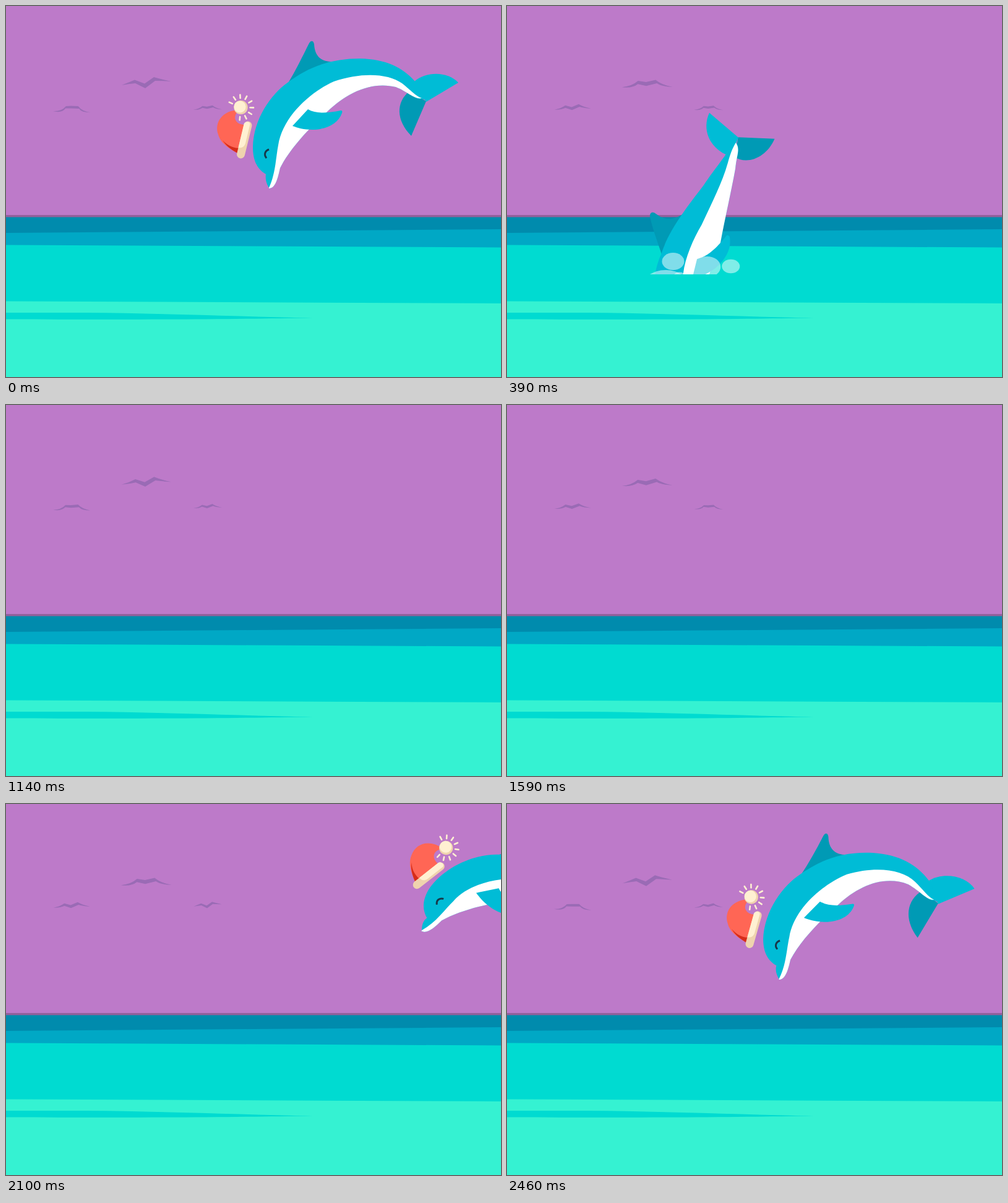
Animation of 800 by 600 pixels, one loop 2490 ms. Source, as an HTML page:

```html
<!DOCTYPE html>
<html lang="en">
<head>
<meta charset="utf-8">
<title>Dolphin dive</title>
<style>
  html, body { margin: 0; width: 100%; height: 100%; overflow: hidden; background: #bd7ac9; }
  svg { display: block; width: 100vw; height: 100vh; }
</style>
</head>
<body>
<svg viewBox="0 0 800 600">
  <defs>
    <clipPath id="surface"><rect width="800" height="434"/></clipPath>
  </defs>
  <rect width="800" height="600" fill="#bd7ac9"/>
  <g id="birds" fill="#9a6bb5"></g>
  <rect y="338" width="800" height="5" fill="#93609c"/>
  <rect y="341.5" width="800" height="259" fill="#008bad"/>
  <path d="M0 367L800 361V600H0Z" fill="#00a8c5"/>
  <path d="M0 386.500L800 390.500V600H0Z" fill="#00dbd1"/>
  <path d="M0 477.500L800 481V600H0Z" fill="#35f2d2"/>
  <path d="M0 496H130C250 497 380 502 496 504.500C380 506 250 508 0 506.500Z" fill="#00dbd1"/>
  <g clip-path="url(#surface)">
    <g id="dolphin"></g>
    <g id="hat">
      <g transform="translate(-385 -216)">
        <path d="M386 192C373 192 367 183 372 174L376 168C350 169 336 188 343 208C347 223 362 231 376 239Z" fill="#ff6655"/>
        <path d="M350 217C359 227 369 230 379 230L376 239C365 233 356 227 350 217Z" fill="#d62c1a"/>
        <path d="M391 193L379.500 240" stroke="#efd3ae" stroke-width="13" stroke-linecap="round"/>
        <path d="M384.500 191C386 186 394 186 394.500 191L387 222C385 228 381 230 375.500 229Z" fill="#fff0d2"/>
        <g id="rays" stroke="#fff0d2" stroke-width="2.600" stroke-linecap="round"></g>
        <circle cx="379.500" cy="164" r="11.200" fill="#efd3ae"/>
        <circle cx="378" cy="163" r="9.600" fill="#fff0d2"/>
      </g>
    </g>
    <g id="foam" fill="#fff" opacity=".5"></g>
    <g id="drops" fill="#fff" opacity=".5"></g>
  </g>
</svg>
<script>
const LOOP = 2490, STEP = 30;
const $ = id => document.getElementById(id);

function add(parent, tag, attrs) {
  const el = document.createElementNS('http://www.w3.org/2000/svg', tag);
  for (const k in attrs) el.setAttribute(k, attrs[k]);
  return parent.appendChild(el);
}

const mix = (a, b, u) => a + (b - a) * u;

function turn(x, y, deg) {
  const r = deg * Math.PI / 180, c = Math.cos(r), s = Math.sin(r);
  return [x * c - y * s, x * s + y * c];
}

// Smooth curve through rows of [time, value, value, ...]
function track(rows) {
  const last = rows.length - 1;
  const slope = (i, k) => {
    const a = rows[Math.max(0, i - 1)], b = rows[Math.min(last, i + 1)];
    return (b[k] - a[k]) / (b[0] - a[0]);
  };
  return t => {
    t = Math.max(rows[0][0], Math.min(rows[last][0], t));
    let i = 0;
    while (i < last - 1 && t > rows[i + 1][0]) i++;
    const p = rows[i], q = rows[i + 1], h = q[0] - p[0], u = (t - p[0]) / h;
    const w = u * u * (3 - 2 * u);
    return p.slice(1).map((v, j) => mix(v, q[j + 1], w)
      + h * u * (1 - u) * ((1 - u) * slope(i, j + 1) - u * slope(i + 1, j + 1)));
  };
}

// A shape with two poses; "place" maps each pair of points to the stage
const tokens = d => d.match(/[A-Z]|-?[\d.]+/g);
function morph(el, a, b) {
  const p = tokens(a), q = tokens(b);
  return place => {
    let d = '';
    for (let i = 0; i < p.length; i++) {
      if (/[A-Z]/.test(p[i])) { d += p[i]; continue; }
      const xy = place(+p[i], +p[i + 1], +q[i], +q[i + 1]);
      d += xy[0].toFixed(2) + ' ' + xy[1].toFixed(2) + ' ';
      i++;
    }
    el.setAttribute('d', d);
  };
}

// Dolphin: an arched pose and a diving pose
const BACK_A = 'M425 294C420 286 419 279 420 272C406 264 399 250 399 228C400 183 428 143 455 124C490 97 528 85 572 85C614 86 641 99 661 122C668 132 673 143 678 152';
const BACK_B = 'M333 415C327 408 326 398 321 392C303 383 296 362 296 335C295 300 305 270 325 244C350 210 395 185 435 169C465 158 485 155 495 152C505 150 515 148 527 148';
const BELLY_A = 'C661 152 650 139 630 131C590 121 550 141 519 171C495 193 460 228 443 262C439 280 435 295 425 295Z';
const BELLY_B = 'C518 163 505 166 490 180C460 207 428 240 407 270C390 293 355 340 345 376C342 395 343 416 333 415Z';
const TEAL = '#00bcd6', DARK = '#009ab5';

const parts = [
  [DARK,
    'M455 126C468 105 480 80 489 62C492 55 497 55 498 62C499 80 508 91 530 90L500 112Z',
    'M325 245C328 225 332 195 339 174C342 168 347 167 349 174C354 188 362 196 383 193L365 222Z'],
  [DARK,
    'M652 138C630 155 630 185 655 210L679 154Z',
    'M502 165C508 190 540 202 570 189L529 147Z'],
  [TEAL,
    'M660 122C680 105 714 106 731 124L679 155Z',
    'M495 152C485 125 495 97 522 86L529 148Z'],
  [TEAL, BACK_A + 'L672 150' + BELLY_A, BACK_B + 'L520 151' + BELLY_B],
  ['#fff',
    'M425 294C436 270 436 245 440 225C447 180 490 140 530 122C575 107 617 109 640 125C652 134 662 146 672 149' + BELLY_A,
    'M333 415C336 390 333 365 332 340C334 290 365 250 397 225C430 200 462 183 490 163C500 157 508 153 520 150' + BELLY_B],
  [TEAL,
    'M463 194L488 167C502 175 520 173 541 169C543 169 544 170 543 173C537 190 518 200 495 200C481 200 471 197 463 194Z',
    'M350 308L367 277C385 282 403 272 420 264C422 264 423 266 423 269C419 286 407 300 385 307C371 311 358 310 350 308Z'],
  ['',
    'M425 232C419 234 416 240 421 246',
    'M320 353.500C314 356 313 362 318 369']
].map(([fill, a, b]) => morph(add($('dolphin'), 'path', fill
  ? { fill }
  : { fill: 'none', stroke: '#17384a', 'stroke-width': 3 }), a, b));

const DIVE = 180, LEAN = -16;
const ROOT = [525, 149], EYE_A = [421, 239], EYE_B = [317, 361];

// eye x, eye y, head angle, pose blend, hat offset x and y
const air = track([
  [-600, 905, 152, 56, -.3, -34, -21],
  [-390, 700, 157, 36, -.3, -38, -24],
  [-210, 556, 174, 16, -.3, -45, -30],
  [-30, 437, 228, 2, -.14, -39.5, -24],
  [0, 421, 239, 0, 0, -36, -23],
  [DIVE, 317, 361, LEAN, 1, -13, -16]
]);

// tail root x, y and angle
const dive = track([
  [DIVE, 525, 149, 0],
  [400, 366, 222, -50],
  [630, 245, 404, -87],
  [750, 205, 530, -98]
]);

function setHat(x, y, deg) {
  $('hat').setAttribute('transform', `translate(${x.toFixed(2)} ${y.toFixed(2)}) rotate(${deg.toFixed(2)})`);
}

function drawAir(t) {
  const [ex, ey, head, blend, hx, hy] = air(t);
  const place = (ax, ay, bx, by) => {
    const b = turn(bx - EYE_B[0], by - EYE_B[1], -LEAN);
    const p = turn(mix(ax - EYE_A[0], b[0], blend), mix(ay - EYE_A[1], b[1], blend), head);
    return [ex + p[0], ey + p[1]];
  };
  parts.forEach(part => part(place));
  const h = turn(hx, hy, head);
  setHat(ex + h[0], ey + h[1], head * (head > 0 ? 1.06 : 1.17));
}

// The tail leads the turn; the front of the body turns less
function drawDive(t) {
  const [rx, ry, angle] = dive(t);
  const bend = (x, y) => angle * (1 - .5 * Math.min(1, Math.hypot(x, y) / 310));
  const warp = (x, y) => {
    x -= ROOT[0];
    y -= ROOT[1];
    const p = turn(x, y, bend(x, y));
    return [rx + p[0], ry + p[1]];
  };
  parts.forEach(part => part((ax, ay, bx, by) => warp(bx, by)));
  const off = turn(-13, -16, LEAN), x = EYE_B[0] + off[0], y = EYE_B[1] + off[1];
  const p = warp(x, y);
  setHat(p[0], p[1], LEAN * 1.17 + bend(x - ROOT[0], y - ROOT[1]));
}

for (let i = 0; i < 9; i++) {
  const a = (-156 + i * 31.4) * Math.PI / 180, c = Math.cos(a), s = Math.sin(a);
  add($('rays'), 'path', {
    d: `M${379.5 + 15 * c} ${164 + 15 * s}L${379.5 + 20.5 * c} ${164 + 20.5 * s}`
  });
}

// Birds: wings up and wings down, around the lowest point of the body
const UP = 'M187 128Q197 124 208 119.500L224 125.500L239 115Q253 119 267 122Q253 121 241 121L225 133L209 125Q198 126 187 128Z';
const DOWN = 'M185 133Q204 134 207 126L217 121.500L236 121Q245 122 268 136Q248 136 243 127.500L225 127L213 127Q205 138 185 133Z';
const WINGS_UP = UP, WINGS_DOWN = DOWN.replace('Q204 134 207 126L217 121.500', 'Q204 134 214 122L225 121.500')
  .replace('L236 121Q245 122 268 136', 'L241 122Q249 133 268 136');
const birds = [[225, 133, 1, 0], [105, 170, .73, .5], [325, 168.5, .57, .687]].map(([x, y, size, up]) => ({
  x, y, size, up, draw: morph(add($('birds'), 'path', {}), WINGS_UP, WINGS_DOWN)
}));

function drawBirds(t) {
  for (const b of birds) {
    const phase = (t / (LOOP / 2) - b.up + 2) % 1;
    const u = 1 - Math.abs(1 - 2 * phase);
    b.draw((ax, ay, bx, by) => [
      b.x + (mix(ax, bx, u) - 225) * b.size,
      b.y + (mix(ay, by, u) - 133) * b.size
    ]);
  }
}

// Splash: x, y, rx, ry at the height of the splash, then speed down
const PEAK = 630;
const splash = [
  ...[
    [178, 433, 13.5, 12, .06], [250, 434, 39.5, 29, .04], [264, 391, 18, 14, .04],
    [304, 378.500, 9.200, 7.200, .02], [328, 407, 22, 17, .07], [373, 408.500, 14.500, 11.300, .08],
    [309, 431, 23, 29, .03], [339, 437, 24, 21, .04]
  ].map(d => [$('foam'), ...d]),
  ...[
    [276, 421.500, 10, 8.500, .06], [296.500, 413, 4.800, 4, .03], [310, 429, 11, 9.500, .05],
    [333, 429, 7.500, 6, .07], [272, 435, 14, 6, .05], [300, 434, 13, 8, .05]
  ].map(d => [$('drops'), ...d])
].map(([group, x, y, rx, ry, speed]) => ({ x, y, ry, speed, el: add(group, 'ellipse', { rx, ry }) }));

function drawSplash(t) {
  const dt = t - PEAK;
  for (const s of splash) {
    const x = s.x + (s.x - 295) * .0006 * dt;
    const y = s.y + s.speed * dt + .00055 * dt * dt;
    s.el.setAttribute('cx', x.toFixed(2));
    s.el.setAttribute('cy', y.toFixed(2));
    s.el.style.display = t > 210 && t < 1050 && y - s.ry < 434 ? '' : 'none';
  }
}

function draw(t) {
  const airTime = t > 1400 ? t - LOOP : t;
  const shown = airTime > -600 && airTime < 750;
  $('dolphin').style.display = $('hat').style.display = shown ? '' : 'none';
  if (shown) airTime <= DIVE ? drawAir(airTime) : drawDive(airTime);
  drawBirds(t);
  drawSplash(t);
}

const start = performance.now();
function tick() {
  const t = (performance.now() - start) % LOOP;
  draw(Math.floor(t / STEP) * STEP);
  requestAnimationFrame(tick);
}
tick();
</script>
</body>
</html>
```
